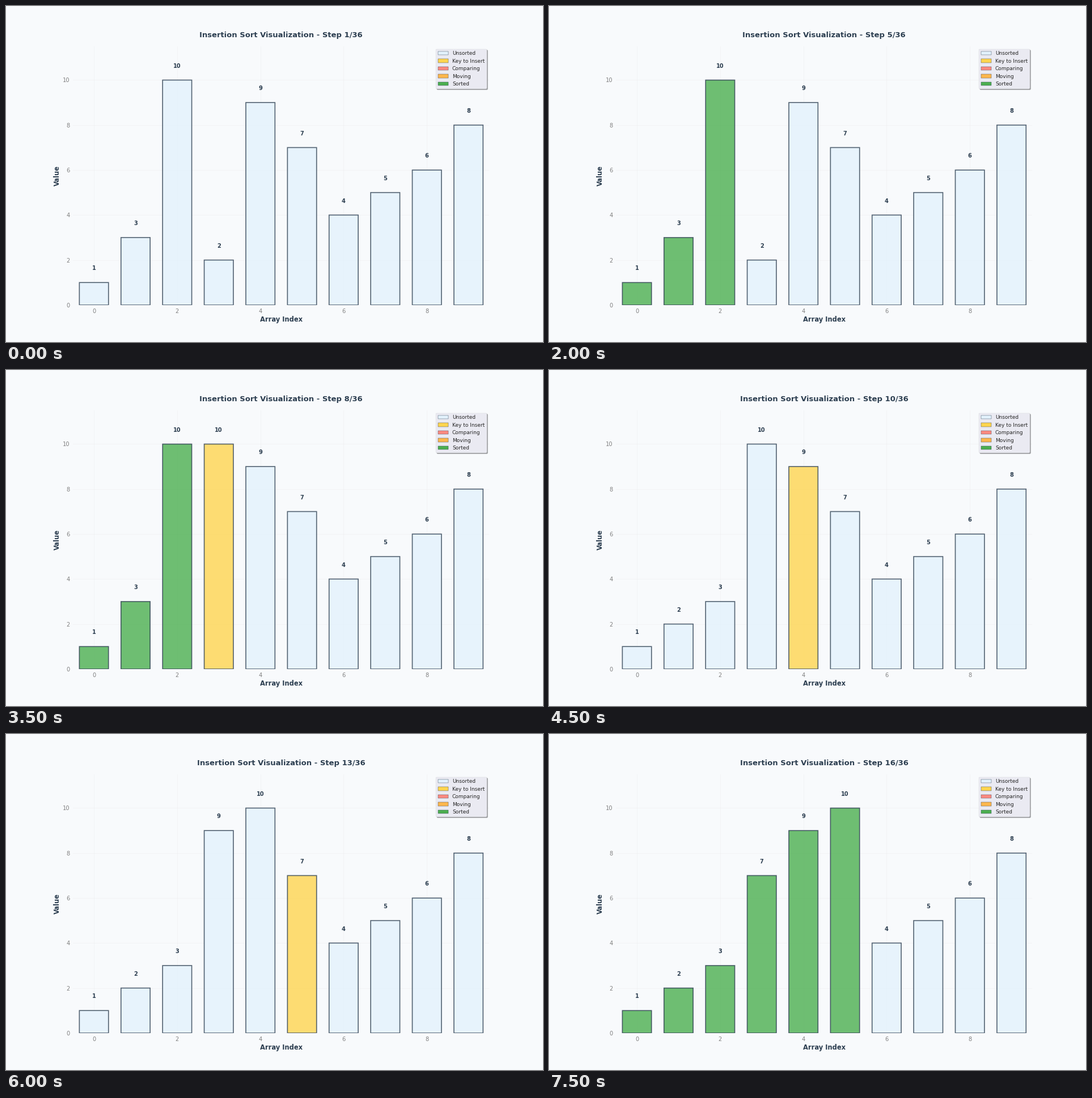
Recreate the animation shown at these times as a matplotlib script. Size 947 px wide and 592 px high, loop 8000 ms.

```python
import matplotlib.pyplot as plt
from matplotlib.animation import FuncAnimation
from matplotlib.patches import Patch

W, H, DPI = 947, 592, 64
PT = H / 10 / DPI  # layout is designed for a 16 x 10 inch page

INK, PAPER = "#2C3E50", "#F8FAFC"
COLORS = {
    "Unsorted": "#E3F2FD",
    "Key to Insert": "#FFD54F",
    "Comparing": "#FF8A80",
    "Moving": "#FFB74D",
    "Sorted": "#4CAF50",
}
VALUES = [1, 3, 10, 2, 9, 7, 4, 5, 6, 8]
FRAMES, INTERVAL = 16, 500

plt.rcParams.update({
    "font.family": "DejaVu Sans",
    "patch.linewidth": 0.3 * PT,
    "axes.axisbelow": True,
})


def paint(done, active=None, state=None):
    """Bar states: the first `done` sorted, one optionally active."""
    marks = ["Sorted" if k < done else "Unsorted" for k in range(len(VALUES))]
    if active is not None:
        marks[active] = state
    return marks


def insertion_steps(values):
    a = list(values)
    steps = [(a[:], paint(0))]
    for i in range(1, len(a)):
        key, j = a[i], i - 1
        steps.append((a[:], paint(0, i, "Key to Insert")))
        while j >= 0 and a[j] > key:
            state = "Moving" if j == i - 1 else "Key to Insert"
            steps.append((a[:], paint(i, i, state)))
            a[j + 1] = a[j]
            j -= 1
        a[j + 1] = key
        steps.append((a[:], paint(i + 1)))
    steps.append((a[:], paint(len(a))))
    return steps


STEPS = insertion_steps(VALUES)

fig = plt.figure(figsize=(W / DPI, H / DPI), dpi=DPI, facecolor=PAPER)
ax = fig.add_axes([0.125, 0.11, 0.775, 0.77], facecolor=PAPER)
ax.set_xlim(-0.5, 9.5)
ax.set_ylim(0, 11.5)
ax.set_xticks(range(0, 10, 2))
ax.set_yticks(range(0, 12, 2))
ax.spines[:].set_visible(False)
ax.tick_params(length=0, pad=7 * PT, labelsize=12 * PT, labelcolor="#808080")
ax.grid(True, color="#E0E0E0", alpha=0.3, linewidth=PT)

bold = dict(fontweight="bold", color=INK)
ax.set_xlabel("Array Index", fontsize=14 * PT, labelpad=4 * PT, **bold)
ax.set_ylabel("Value", fontsize=14 * PT, labelpad=4 * PT, **bold)
title = ax.set_title("", fontsize=16 * PT, pad=20 * PT, **bold)

bars = ax.bar(range(len(VALUES)), VALUES, width=0.7, alpha=0.8,
              edgecolor=INK, linewidth=2 * PT, snap=False)
labels = [ax.text(k, 0, "", ha="center", va="bottom", fontsize=12 * PT, **bold)
          for k in range(len(VALUES))]

handles = [Patch(facecolor=c, edgecolor=INK, linewidth=0.5 * PT, label=name)
           for name, c in COLORS.items()]
ax.legend(handles=handles, loc="upper right", fontsize=11 * PT, shadow=True,
          fancybox=True, frameon=True, facecolor="#EAEAF2", edgecolor="0.8",
          labelcolor="#262626")


def update(n):
    values, marks = STEPS[n]
    title.set_text(f"Insertion Sort Visualization - Step {n + 1}/{len(STEPS)}")
    for bar, label, v, mark in zip(bars, labels, values, marks):
        bar.set_height(v)
        bar.set_facecolor(COLORS[mark])
        label.set_y(v + 0.5)
        label.set_text(str(v))
    return [title, *bars, *labels]


anim = FuncAnimation(fig, update, frames=FRAMES, interval=INTERVAL,
                     init_func=lambda: update(0), repeat=True, repeat_delay=0)
plt.show()
```
